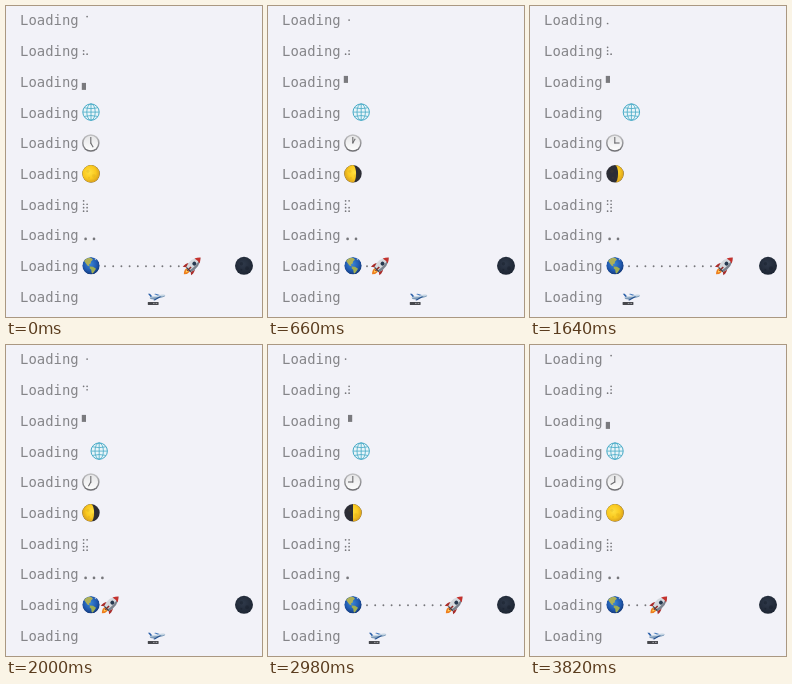
An HTML page for the animation above (3870 ms loop, 256 by 311 pixels).

```html
<!DOCTYPE html>
<html lang="en">
<head>
<meta charset="utf-8">
<title>Loading</title>
<style>
  html, body { margin: 0; width: 100%; height: 100%; overflow: hidden; background: #f2f2f8; }
  svg { display: block; width: 256px; height: 311px; }
  text { font: 13.9px "DejaVu Sans Mono", "Liberation Mono", monospace; fill: #858589; }
  .dots { fill: none; stroke: #77777b; stroke-linecap: round; }
  .fill { fill: #7a7a7e; }
</style>
</head>
<body>
<svg viewBox="0 0 256 311">
  <defs>
    <radialGradient id="gold" gradientUnits="userSpaceOnUse" cx="-1.5" cy="-1.5" r="10.5">
      <stop offset="0" stop-color="#ffe040"/><stop offset=".6" stop-color="#fac91f"/><stop offset="1" stop-color="#d9a11f"/>
    </radialGradient>
    <radialGradient id="night" cx=".45" cy=".4" r=".65">
      <stop offset="0" stop-color="#2f394a"/><stop offset="1" stop-color="#1c2431"/>
    </radialGradient>
    <radialGradient id="sea" cx=".45" cy=".4" r=".65">
      <stop offset="0" stop-color="#3a86d8"/><stop offset=".6" stop-color="#1f58ae"/><stop offset="1" stop-color="#123068"/>
    </radialGradient>
    <linearGradient id="rim" x2="0" y2="1">
      <stop offset="0" stop-color="#c4c4c6"/><stop offset="1" stop-color="#6c6c70"/>
    </linearGradient>
    <linearGradient id="face" x2="0" y2="1">
      <stop offset="0" stop-color="#e6e6e7"/><stop offset="1" stop-color="#fdfdfd"/>
    </linearGradient>
    <clipPath id="disc"><circle r="8.8"/></clipPath>
  </defs>

  <g id="labels"></g>

  <path id="orbit" class="dots" stroke-width="1.7"/>
  <path id="snake" class="dots" stroke-width="1.7"/>
  <path id="ring" class="dots" stroke-width="1.7"/>
  <rect id="block" class="fill" width="4.2" height="7"/>

  <g id="globe" fill="none" stroke="#45a9c6" stroke-width=".8">
    <circle r="8.2" fill="#e9f5f9" stroke-width="1"/>
    <ellipse rx="4.2" ry="8.2"/>
    <path d="M0-8V8M-8 0H8M-6.7-4.3Q0-2.6 6.7-4.3M-6.7 4.3Q0 2.6 6.7 4.3"/>
  </g>

  <g transform="translate(84.8 137)">
    <circle r="8.8" fill="url(#rim)"/>
    <circle r="7.3" fill="url(#face)"/>
    <g stroke="#6b6b6e" stroke-width="1.1">
      <path d="M0 .4V-6"/>
      <path id="hour" d="M0 .4V-4.8"/>
    </g>
  </g>

  <g transform="translate(85 167.8)">
    <circle r="8.7" fill="#2c2d35"/>
    <path id="lit" fill="url(#gold)"/>
    <g fill="#8a6410" opacity=".1"><circle cx="-3" cy="-2.5" r="1.6"/><circle cx="2.8" cy="2" r="1.9"/><circle cx="-2" cy="4" r="1.1"/></g>
  </g>

  <path id="ellipsis" class="dots" stroke-width="2.7"/>

  <g transform="translate(85 259.8)" clip-path="url(#disc)">
    <circle r="8.8" fill="url(#sea)"/>
    <path d="M-7-5L-4-7.6 0-8 2-6 .2-4.6-.4-2.4-2.2-1.2-1.2.8-3.6-.4-5.6-3Z" fill="#adb058"/>
    <path d="M-1 .8L2 1 5 3 3.6 5.2 1.8 7.6 .7 7.2 .2 4-1.4 2.4Z" fill="#a0ae50"/>
    <path d="M3.2-7.6L5.6-5.6 4.2-5.8Z" fill="#dbe6ee"/>
  </g>
  <path id="trail" class="dots" stroke-width="1.9"/>
  <g transform="translate(238 259.8)">
    <circle r="9" fill="url(#night)"/>
    <g fill="#141b26" opacity=".4"><circle cx="-2.5" cy="-2" r="1.7"/><circle cx="3" cy="2.4" r="1.9"/><circle cx="-2.6" cy="4" r="1"/></g>
  </g>
  <g id="rocket">
    <g transform="rotate(45)">
      <path d="M-2.4 5.5Q-2.9 9 0 11.8Q2.9 9 2.4 5.5Z" fill="#ee7d1d"/>
      <path d="M-1 5.5Q-1.2 8 0 9.4Q1.2 8 1 5.5Z" fill="#ffd95c"/>
      <path d="M-2.7-1Q-6.8 1.6-6 7.4L-2.3 4.8ZM2.7-1Q6.8 1.6 6 7.4L2.3 4.8Z" fill="#a92c2a"/>
      <path d="M0-11.6Q7.4-4 3.2 5.8H-3.2Q-7.4-4 0-11.6Z" fill="#d5d9de"/>
      <path d="M0-11.6Q7.4-4 3.2 5.8H1.2Q3.6-4 0-11.6Z" fill="#7b828d"/>
      <path d="M0-11.8Q2.6-9 3.5-6.8Q0-7.8-3.5-6.8Q-2.6-9 0-11.8Z" fill="#c5322e"/>
      <circle cy="-3" r="2" fill="#26394f"/>
      <path d="M0 1.6V7" stroke="#8f2524" stroke-width="1.5"/>
      <path d="M-3 5.2H3" stroke="#3c4048" stroke-width="1.2"/>
    </g>
  </g>

  <g id="plane">
    <rect x="-8.8" y="4.7" width="10.8" height="3" rx=".4" fill="#47484d"/>
    <path d="M-3.6 6.2H1.6" stroke="#c8c8ca" stroke-width=".7" stroke-dasharray="1.6 1"/>
    <path d="M-8.6-3.4L-6.6-3.5-4-.4-6-.1Z" fill="#2a5fa8"/>
    <path d="M-7 .6Q-5.5-.9-2-1.2L5.4-2.6Q8.5-3 8.7-1.8Q8.3-.3 5 .2L-3.4 2.1Q-6.2 2.5-7 .6Z" fill="#c6d6e4"/>
    <path d="M-7 .6Q-6.2 2.5-3.4 2.1L5 .2Q8.3-.3 8.7-1.8Q5-.4-7 .6Z" fill="#7d9ab8"/>
    <path d="M-2.6-3.2L-.9-3.4 3.2-2.1 1-1.6Z" fill="#3d74b8"/>
    <path d="M3-.6L-3.6 2.9-1.8 3.2 5-.6Z" fill="#23508f"/>
  </g>
</svg>
<script>
const LOOP = 3870, STEP = 20, COL = 8.2, PITCH = 30.7;
const $ = id => document.getElementById(id);
const set = (id, name, value) => $(id).setAttribute(name, value);
const move = (id, x, y) => set(id, 'transform', `translate(${x} ${y})`);
const dot = (x, y) => `M${x} ${y}h.01`;
const row = (n, x, y, gap) => Array.from({ length: n }, (_, i) => dot(x + gap * i, y)).join('');

const CLOCKWISE = [4, 5, 6, 8, 7, 3, 2, 1];
const SNAKE = [124, 145, 1456, 456, 3456, 356, 236, 1236, 123, 1234];
const BLOCKS = [[0, 1], [0, 0], [1, 0], [1, 1]];
const BOUNCE = [0, 1, 2, 3, 3, 2, 1, 0];

$('labels').innerHTML = Array.from({ length: 10 }, (_, i) =>
  `<text x="14.1" y="${19.4 + PITCH * i}">Loading</text>`).join('');

// Braille cell: dots 1-3 and 7 on the left, 4-6 and 8 on the right
function braille(id, dots, line) {
  set(id, 'd', [...String(dots)].map(d => {
    const y = d > 6 ? 3 : (d - 1) % 3;
    return dot('4568'.includes(d) ? 81.1 : 77.6, 10.6 + 3.45 * y + PITCH * line);
  }).join(''));
}

function moon(phase) {
  const r = 8.7, p = phase > 4 ? 8 - phase : phase;
  const rx = Math.max(.01, r * Math.abs(Math.cos(p * Math.PI / 4)) ** 3);
  set('lit', 'd', p ? `M0 ${-r}A${r} ${r} 0 0 1 0 ${r}A${rx} ${r} 0 0 ${p > 2 ? 1 : 0} 0 ${-r}Z` : '');
  set('lit', 'transform', `scale(${phase > 4 ? -1 : 1} 1)`);
}

function draw(t) {
  const ticks = (ms, lead) => Math.floor((t + lead) / ms);
  const n = ticks(80, 68);

  const gap = CLOCKWISE[n % 8];
  braille('orbit', gap, 0);
  braille('snake', SNAKE[(n + 6) % 10], 1);
  braille('ring', CLOCKWISE.filter(d => d !== gap).join(''), 6);

  const [bx, by] = BLOCKS[n % 4];
  set('block', 'x', 75.8 + 4.2 * bx);
  set('block', 'y', 69.9 + 7 * by);

  move('globe', 85 + COL * BOUNCE[n % 8], 106.1);
  set('hour', 'transform', `rotate(${30 * (4 + ticks(74.5, 76))})`);
  moon((n + 4) % 8);
  set('ellipsis', 'd', row((n + 1) % 3 + 1, 79.6, 232.9, 8.4));

  const k = (10 + ticks(99.5, 6)) % 15;
  set('trail', 'd', row(k, 99, 260.2, COL));
  move('rocket', 104.2 + COL * k, 259.8);
  move('plane', 85 + COL * ((8 + ticks(66.5, 13)) % 10), 291.2);
}

// The picture advances at 50 steps a second
function frame() {
  const t = performance.now() % LOOP;
  draw(t - t % STEP);
  requestAnimationFrame(frame);
}
draw(0);
requestAnimationFrame(frame);
</script>
</body>
</html>
```
